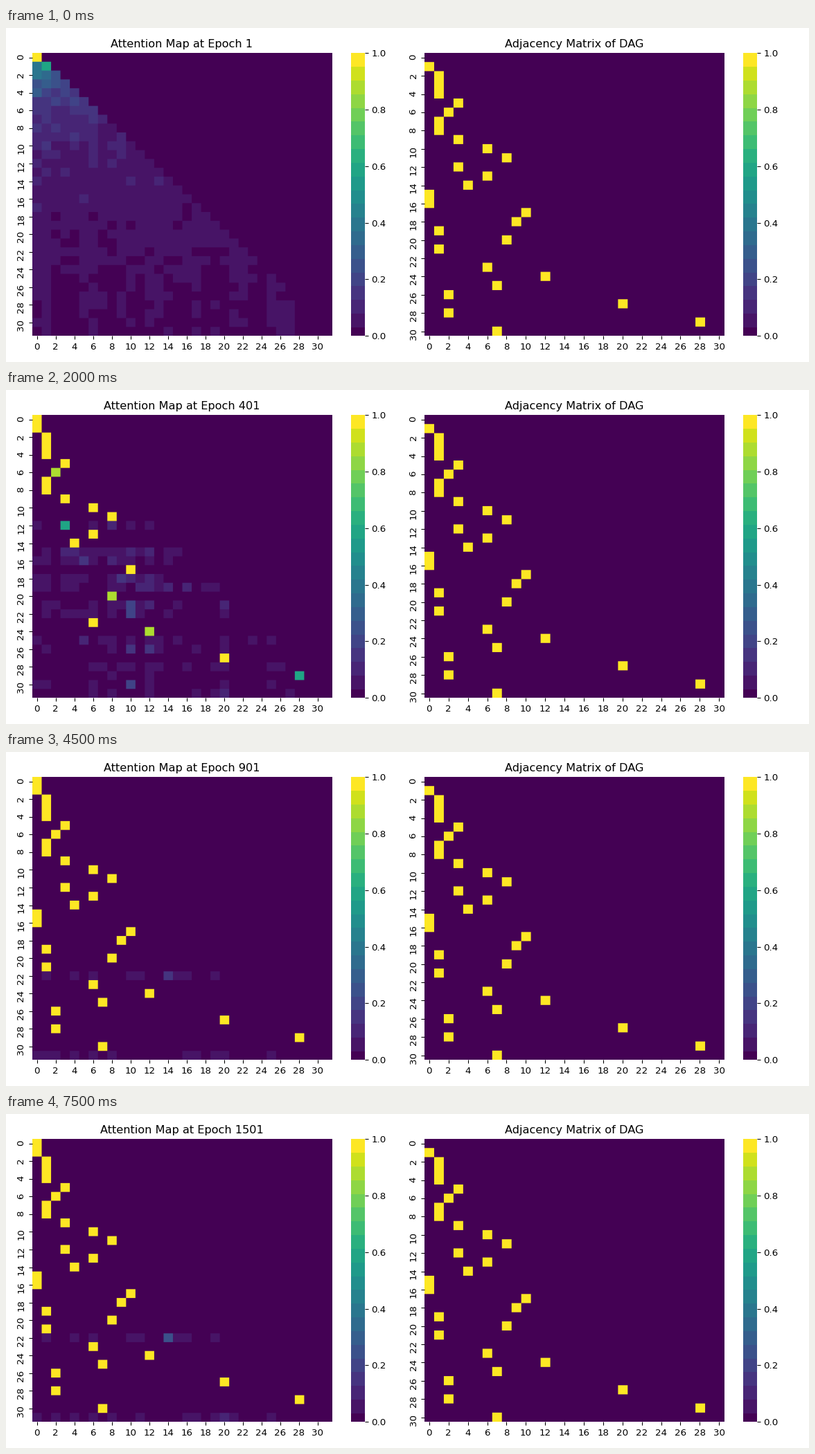
These frames come from a looping animation (1159x483 px, 8 s). A matplotlib script:

```python
import numpy as np
import matplotlib.pyplot as plt
from matplotlib.animation import FuncAnimation
from matplotlib.colors import BoundaryNorm, ListedColormap

W, H, DPI = 1159, 483, 100
TOP, BOTTOM = 36.2, 445.2
N = 32
FRAMES, STEP = 16, 500
ZOOM = W / 1200  # the layout is a 12 x 5 inch figure, slightly reduced

plt.rcParams.update({
    "font.family": "DejaVu Sans", "font.size": 10 * ZOOM,
    "axes.titlepad": 6 * ZOOM,
    **{f"{a}tick.major.{key}": size * ZOOM for a in "xy"
       for key, size in (("size", 3.5), ("pad", 3.5), ("width", .8))},
})

# Banded viridis: one narrow dark band, then twenty equal ones
EDGES = np.concatenate([[0], np.linspace(.03, 1, 21)])
MIDS = (EDGES[:-1] + EDGES[1:]) / 2
MIDS[0], MIDS[-1] = 0, 1
CMAP = ListedColormap(plt.get_cmap("viridis")(MIDS))
NORM = BoundaryNorm(EDGES, len(MIDS))

# Parent of nodes 1 to 30; node 22 has none
PARENTS = [0, 1, 1, 1, 3, 2, 1, 1, 3, 6, 8, 3, 6, 4, 0, 0, 10, 9, 1, 8,
           1, None, 6, 12, 7, 2, 20, 2, 28, 7]
EDGE_LIST = [(i, p) for i, p in enumerate(PARENTS, 1) if p is not None]

# Step at which a row is half learned; all other rows learn at EARLY
EARLY = 2.95
SLOW = {3.5: [6, 20, 24], 3.9: [12, 29],
        5.3: [16, 18, 19, 21, 25, 28, 30], 6.4: [15, 26]}

STRONG = [1, 5, 6, 9, 10, 12, 13, 14, 17, 21, 22, 25, 26, 27]
HUBS = [8, 10, 12, 20]
ORPHANS = {22: 16, 31: 1}  # parentless row: column it drifts towards

rng = np.random.default_rng(4)
base, drift = rng.normal(size=(2, N, N))
cols = np.arange(N)
taste = np.where(np.isin(cols, STRONG), .22, -.22)
half = np.full(N, EARLY)
for step, rows in SLOW.items():
    half[rows] = step


def attention(k):
    """Noisy causal softmax that sharpens, then gives way to the parents."""
    spread = np.interp(k, [2, 4], [.22, .6])
    score = spread * (base + .08 * k * drift)
    score += taste * cols[:, None] / N + .4 * np.exp(-cols / 2)
    score[:, HUBS] += np.interp(k, [2, 4, 7], [0, 1, 0])
    for row, centre in ORPHANS.items():
        pull = np.exp(-((cols - centre) / 4) ** 2)
        score[row] += np.interp(k, [4, 7], [0, 1.2]) * pull
    grid = np.tril(np.exp(score))
    grid *= (1 - .007 * cols[:, None]) / grid.sum(axis=1, keepdims=True)

    learned = 1 / (1 + np.exp(-3.5 * (k - half)))
    for row, parent in EDGE_LIST:
        grid[row] *= 1 - learned[row]
        grid[row, parent] += learned[row]
    return grid


fig = plt.figure(figsize=(W / DPI, H / DPI), dpi=DPI, facecolor="white")


def panel(x0, x1):
    ax = fig.add_axes([x0 / W, 1 - BOTTOM / H, (x1 - x0) / W,
                       (BOTTOM - TOP) / H])
    ax.spines[:].set_visible(False)
    return ax


def enlarge(data):
    return np.kron(data, np.ones((14, 14)))


def heatmap(x0, data, title):
    n = len(data)
    ax = panel(x0, x0 + 432.3)
    # Enlarged cells with bilinear sampling give slightly soft cell edges
    image = ax.imshow(enlarge(data), cmap=CMAP, norm=NORM, aspect="auto",
                      extent=(0, n, n, 0), interpolation="bilinear",
                      interpolation_stage="rgba")
    ticks = np.arange(0, n, 2)
    ax.set_xticks(ticks + .5, ticks)
    ax.set_yticks(ticks + .5, ticks, rotation="vertical")
    label = ax.set_title(title)

    bar = panel(x0 + 460, x0 + 480.3)
    bar.pcolormesh([0, 1], EDGES, MIDS[:, None], cmap=CMAP, norm=NORM)
    bar.set(xlim=(0, 1), ylim=(0, 1), xticks=[])
    bar.yaxis.tick_right()
    bar.set_yticks(np.arange(6) / 5, [f"{v / 5:.1f}" for v in range(6)])
    return image, label


def heading(k):
    return f"Attention Map at Epoch {100 * k + 1}"


adjacency = np.zeros((N - 1, N - 1))
for child, parent in EDGE_LIST:
    adjacency[child, parent] = 1

image, label = heatmap(37.8, attention(0), heading(0))
heatmap(603.9, adjacency, "Adjacency Matrix of DAG")


def update(k):
    image.set_data(enlarge(attention(k)))
    label.set_text(heading(k))
    return image, label


anim = FuncAnimation(fig, update, frames=FRAMES, interval=STEP,
                     repeat=True, repeat_delay=0, blit=False)
plt.show()
```
